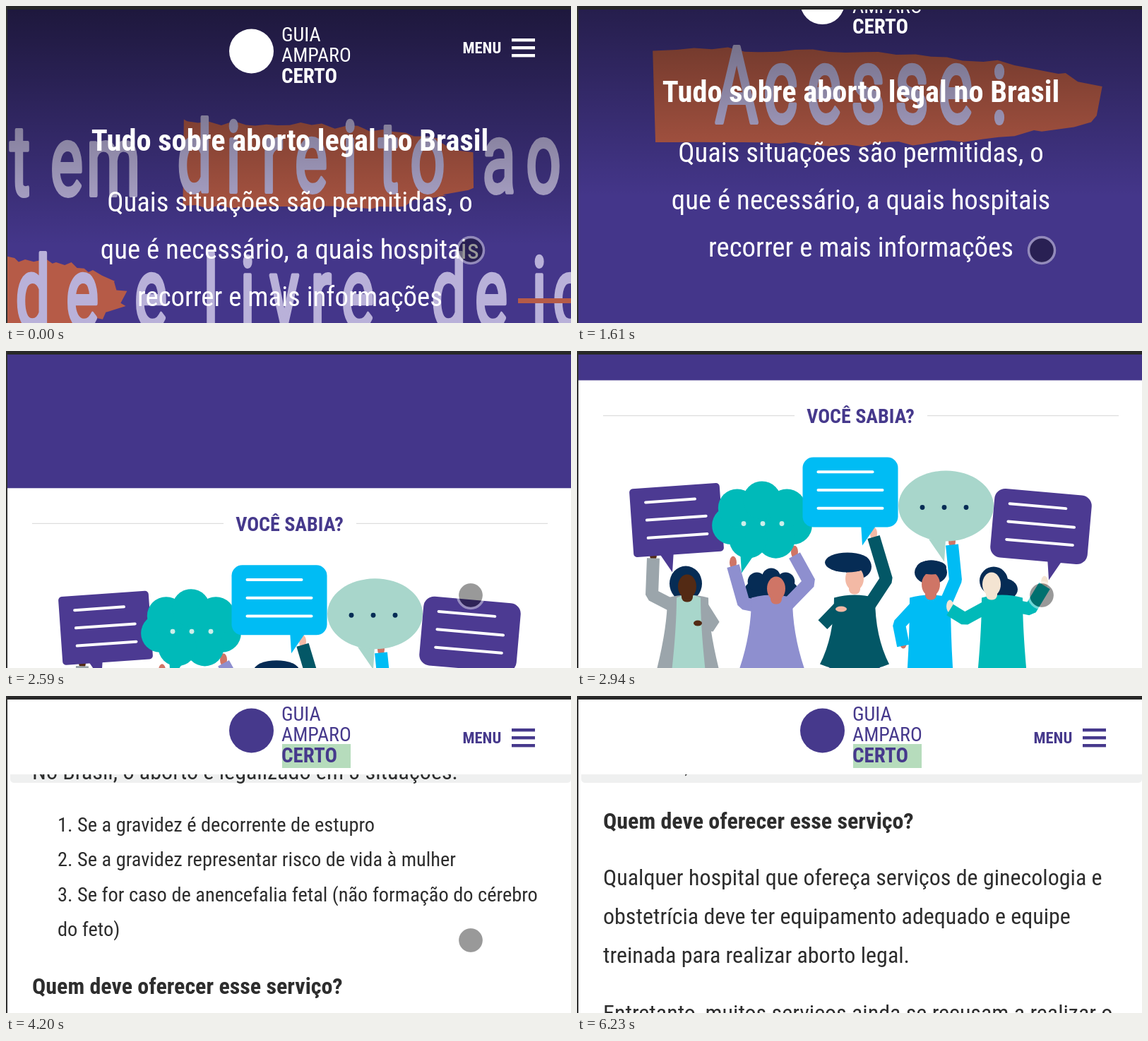
These frames come from a looping animation (800x449 px, 6300 ms). An HTML page:

```html
<!DOCTYPE html>
<html lang="pt-BR">
<head>
<meta charset="utf-8">
<style>
html, body { margin: 0; width: 100%; height: 100%; overflow: hidden; background: #fff; }
svg { display: block; width: 100vw; height: 100vh; }
text { font-family: "Roboto Condensed", Roboto, sans-serif; font-stretch: condensed; white-space: pre; }
.hand { font-family: Roboto, sans-serif; font-stretch: normal; text-anchor: middle; fill: #b9b1d9;
  stroke: #b9b1d9; stroke-width: 5px; stroke-linejoin: round; vector-effect: non-scaling-stroke; }
</style>
</head>
<body>
<svg id="stage" viewBox="0 0 800 449"></svg>
<script>
const LOOP = 6300;
const NAVY = '#062c55', INK = '#46398c', PURPLE = '#4c3a92', TEAL = '#00bab9', CYAN = '#00bcf4',
  DEEP = '#035766', GREY = '#9ba5ab', MINT = '#a8d6cb', LILAC = '#8e8fcf', ORANGE = '#b65b47',
  BROWN = '#532a14', SALMON = '#cf7566', PEACH = '#f3b9a5', CREAM = '#f4e4d2';

// Narrow the regular face when no condensed one is installed.
const pen = document.createElement('canvas').getContext('2d');
const measure = font => (pen.font = font, pen.measureText('Quais hospitais').width);
const narrow = measure('condensed 100px "Roboto Condensed", Roboto') <
  measure('100px Roboto') * .95 ? 1 : .88;

let seed = 1;
const jitter = size => {
  const n = Math.sin(seed++ * 12.9898) * 43758.5453;
  return (n - Math.floor(n) - .5) * 2 * size;
};

const text = (x, y, size, s, fill, weight = 400, anchor = 'start') =>
  `<text transform="translate(${x} ${y}) scale(${narrow} 1)" font-size="${size}" fill="${fill}"
    font-weight="${weight}" text-anchor="${anchor}">${s}</text>`;
const lines = (x, y, gap, size, rows, ...style) =>
  rows.map((s, i) => text(x, y + gap * i, size, s, ...style)).join('');
const path = (d, fill) => `<path d="${d}" fill="${fill}"/>`;
const oval = (x, y, rx, ry, fill) =>
  `<ellipse cx="${x}" cy="${y}" rx="${rx}" ry="${ry}" fill="${fill}"/>`;
const rect = (x, y, w, h, fill, r = 0) =>
  `<rect x="${x}" y="${y}" width="${w}" height="${h}" rx="${r}" fill="${fill}"/>`;

// Hand lettering: every letter is centred on an even pitch.
const hand = (x, y, pitch, s, size = 140) =>
  `<text class="hand" font-size="${size}" transform="translate(${x} ${y}) scale(.62 1)"
    x="${[...s].map((_, i) => i * pitch / .62).join(' ')}">${s}</text>`;

// Ragged paint stroke that tapers towards its right end.
function brush(x, y, w, h, taper) {
  const n = 26, edge = side => Array.from({ length: n + 1 }, (_, i) => {
    const u = i / n, half = h * (1 - taper * u ** 5);
    return `${x + w * u + jitter(u > .85 || !i ? 14 : 3)} ${y + side * half + 8 * (u - .5) + jitter(4)}`;
  });
  return path(`M${edge(-1).join('L')}L${edge(1).reverse().join('L')}z`, ORANGE);
}

const header = (dy, ink, sticky) =>
  oval(347.5, 64 + dy, 31.5, 31.5, ink) +
  (sticky ? rect(391, 68, 97, 34, '#b6dcbc') : '') +
  lines(390, 50 + dy, 29, 28, ['GUIA', 'AMPARO'], ink) +
  text(390, 108.5 + dy, 29, 'CERTO', ink, 700) +
  text(646.5, 67, 22.5, 'MENU', ink, 700) +
  [46, 57, 68].map(y => rect(716, y, 33, 4.4, ink)).join('');

const hero = () => `
  <linearGradient id="shade" x2="0" y2="1">
    <stop stop-color="#000" stop-opacity=".57"/><stop offset="1" stop-opacity="0"/>
  </linearGradient>
  ${rect(0, 0, 800, 659, '#44368a')}
  <g id="slogan">
    ${brush(240, 228, 420, 60, .6)}${brush(-60, 408, 230, 48, .9)}
    ${hand(20, 268, 66, 'tem')}${hand(267, 263, 55, 'direito')}${hand(698, 264, 63, 'ao')}
    ${hand(38, 455, 70, 'de')}${hand(205, 455, 0, 'e')}${hand(290, 455, 52, 'livre')}
    ${hand(627, 455, 60, 'de')}${hand(755, 455, 42, 'ic')}
    ${rect(725, 414, 80, 7, ORANGE)}
  </g>
  <g id="visit">
    ${brush(118, 200, 622, 66, .7)}${hand(226, 234, 62, 'Acesse:', 150)}
    <g id="typed">${hand(26, 437, 71, 'mapa', 148)}</g>
  </g>
  ${rect(0, 0, 800, 340, 'url(#shade)')}
  ${header(0, '#fff')}
  ${text(402, 205, 42.4, 'Tudo sobre aborto legal no Brasil', '#fff', 700, 'middle')}
  ${lines(402, 290.5, 67, 38.8, ['Quais situações são permitidas, o',
    'que é necessário, a quais hospitais', 'recorrer e mais informações'], '#fff', 400, 'middle')}`;

// Oval with a scalloped rim, for the cloud and for curly hair.
const puff = (x, y, rx, ry, r, n, fill) => oval(x, y, rx, ry, fill) +
  Array.from({ length: n }, (_, i) => {
    const a = (i + .25) / n * 2 * Math.PI;
    return oval(x + rx * Math.cos(a), y + ry * Math.sin(a), r, r, fill);
  }).join('');
const tail = (x, y, dir, fill) => path(`M${x - 2 * dir} ${y - 32}h${24 * dir}L${x} ${y}z`, fill);
const dots = (x, y, gap, fill) => [-1, 0, 1].map(i => oval(x + i * gap, y, 3.4, 3.4, fill)).join('');

function speech(x, y, w, h, r, turn, fill) {
  const rows = [0, 1, 2].map(i =>
    rect(20 - w / 2, h * (.26 * i - .31), w - (i ? 40 : 54), 4, '#fff', 2)).join('');
  return `<g transform="translate(${x} ${y}) rotate(${turn})">${rect(-w / 2, -h / 2, w, h, fill, r)}${rows}</g>`;
}

const bubbles = () =>
  tail(135, 314, -1, PURPLE) + speech(141, 240, 128, 97, 5, -4, PURPLE) +
  tail(233, 315, 1, TEAL) + puff(262, 241, 45, 29, 27, 7, TEAL) + dots(263, 245, 27, '#cdeeea') +
  tail(404, 276, 1, CYAN) + speech(387, 200.5, 135, 99, 15, 0, CYAN) +
  tail(520, 299, -1, MINT) + oval(522.5, 220, 67.5, 50, MINT) + dots(520, 222, 31, NAVY) +
  tail(668, 325, 1, PURPLE) + speech(657, 249, 138, 98, 15, 5, PURPLE);

const torso = (x, half, wide, hem, fill) => path(
  `M${x - half} 350Q${x} 342 ${x + half} 350Q${x + half} 405 ${x + wide} ${hem - 6}
   Q${x} ${hem + 14} ${x - wide} ${hem - 6}Q${x - half} 405 ${x - half} 350z`, fill);

// A figure is its centre, hem and head, with an elbow and a hand for each arm.
function person({ x, hem, wide, head: [hx, hy], arms, skin, top, legs, hair, fringe = '', front = '' }) {
  const limbs = [-1, 1].map(s =>
    path(`M${x + s * 36} ${hem - 8}H${x + s}L${x + s * 18} 590H${x + s * 30}z`, legs) +
    path(`M${x + s * 24 - 8} 585q8 5 14 4q6 3 5 9l-20-2z`, NAVY)).join('');
  const sleeves = arms.map(([elbow, [px, py]], i) =>
    oval(px, py - 5, 5, 9, skin) +
    `<path d="M${x + (i ? 20 : -20)} 362L${elbow}L${px} ${py}" fill="none" stroke="${top}"
      stroke-width="18" stroke-linejoin="bevel"/>`).join('');
  return limbs + hair + sleeves + torso(x, 29, wide, hem, top) + front +
    rect(hx - 8, hy, 16, 22, skin, 7) + oval(hx, hy, 13, 17, skin) + fringe;
}

const people = () => [
  { x: 157, hem: 501, wide: 56, head: [156, 334], arms: [[[106, 346], [108, 294]], [[194, 389], [176, 386]]],
    skin: BROWN, top: GREY, legs: BROWN, hair: oval(154, 330, 23, 25, NAVY),
    front: torso(158, 17, 29, 503, MINT) + oval(171, 386, 6, 4, BROWN) },
  { x: 276, hem: 465, wide: 49, head: [282, 337], arms: [[[236, 358], [221, 305]], [[329, 328], [308, 290]]],
    skin: SALMON, top: LILAC, legs: DEEP, hair: puff(275, 337, 26, 16, 13, 7, NAVY) },
  { x: 393, hem: 450, wide: 49, head: [393, 323], arms: [[[348, 388], [368, 368]], [[438, 324], [420, 264]]],
    skin: PEACH, top: DEEP, legs: PURPLE, hair: oval(398, 306, 19, 17, NAVY),
    fringe: oval(383, 300, 32, 14, NAVY), front: oval(374, 366, 8, 4, PEACH) },
  { x: 500, hem: 470, wide: 33, head: [501, 331], arms: [[[456, 388], [462, 418]], [[536, 325], [531, 275]]],
    skin: SALMON, top: CYAN, legs: GREY, hair: oval(501, 314, 23, 17, NAVY),
    fringe: oval(502, 307, 21, 10, NAVY) },
  { x: 602, hem: 496, wide: 38, head: [587, 331], arms: [[[549, 380], [528, 367]], [[642, 366], [662, 333]]],
    skin: CREAM, top: TEAL, legs: '#344560', hair: oval(590, 326, 20, 20, NAVY) + oval(602, 338, 22, 16, NAVY) },
].map(person).join('');

const about = () => `
  ${rect(37, 708.5, 271, 1.2, '#ddd')}${rect(496, 708.5, 271, 1.2, '#ddd')}
  ${text(401.5, 719.5, 28, 'VOCÊ SABIA?', INK, 700, 'middle')}
  <g transform="translate(0 617)">
    ${path('M78 592C82 540 300 570 400 566S705 540 696 602S350 630 240 624S76 640 78 592z', '#f3f3f3')}
    ${people()}${bubbles()}
  </g>
  <g fill="#2d2d2d">
    ${text(37, 1315, 32.1, 'No Brasil, o aborto é legalizado em 3 situações:')}
    ${lines(73, 1389, 49.5, 28.4, ['1. Se a gravidez é decorrente de estupro',
      '2. Se a gravidez representar risco de vida à mulher',
      '3. Se for caso de anencefalia fetal (não formação do cérebro', 'do feto)'])}
    ${text(37, 1619, 32, 'Quem deve oferecer esse serviço?', '#2d2d2d', 700)}
    ${lines(37, 1699, 55, 32, ['Qualquer hospital que ofereça serviços de ginecologia e',
      'obstetrícia deve ter equipamento adequado e equipe', 'treinada para realizar aborto legal.'])}
    ${text(37, 1891, 32, 'Entretanto, muitos serviços ainda se recusam a realizar o')}
  </g>`;

const $ = id => document.getElementById(id);
$('stage').innerHTML = `
  <g id="page">${hero()}${about()}</g>
  <g id="bar">${rect(789, 5, 6, 55, '#d9d9d9')}</g>
  <g id="sticky">
    <g opacity=".07">${rect(6, 105, 794, 18, '#233', 5)}</g>
    ${rect(0, 0, 800, 111, '#fff')}${header(-15, INK, true)}
  </g>
  <g id="touch">
    <circle cx="658" cy="346" r="17" fill-opacity=".4"/>
    <circle cx="658" cy="346" r="18.5" fill="none" stroke="#fff" stroke-opacity=".42" stroke-width="3.5"/>
  </g>
  ${rect(0, 0, 800, 5, '#282828')}${rect(0, 0, 2, 449, '#303030')}`;

// Scroll offset over time, joined by smooth cubic segments.
const stops = [[0, 0], [1400, 0], [1610, 69], [2170, 297], [2940, 617], [3500, 938],
  [4200, 1197], [4900, 1405], [5400, 1431], [LOOP, 1431]];
const slope = i => {
  const a = stops[i - 1], b = stops[i], c = stops[i + 1];
  return !a || !c || a[1] === b[1] || b[1] === c[1] ? 0 : (c[1] - a[1]) / (c[0] - a[0]);
};
function scrollAt(t) {
  const i = stops.findIndex((s, n) => n && t <= s[0]) - 1;
  const [t0, y0] = stops[i], [t1, y1] = stops[i + 1], d = t1 - t0, u = (t - t0) / d, v = 1 - u;
  return v * v * (1 + 2 * u) * y0 + u * u * (3 - 2 * u) * y1 + d * u * v * (v * slope(i) - u * slope(i + 1));
}

const clamp = x => Math.max(0, Math.min(1, x));
const show = (id, on) => $(id).setAttribute('visibility', on ? 'visible' : 'hidden');
const shift = (id, y) => $(id).setAttribute('transform', `translate(0 ${y})`);
const typed = $('typed').querySelector('text');

function draw(now) {
  const t = now % LOOP, y = scrollAt(t);
  shift('page', -y);
  show('slogan', t < 1050);
  show('visit', t >= 1050);
  typed.textContent = 'mapa'.slice(0, Math.max(0, Math.floor((t - 1700) / 110)));
  shift('bar', y * .1045);
  $('bar').setAttribute('opacity', clamp((t - 3200) / 150) * clamp((4000 - t) / 250));
  shift('sticky', -125 * (1 - clamp((t - 3800) / 280)));
  show('sticky', t >= 3800);
  show('touch', t < 5400);
  requestAnimationFrame(draw);
}
requestAnimationFrame(draw);
</script>
</body>
</html>
```
